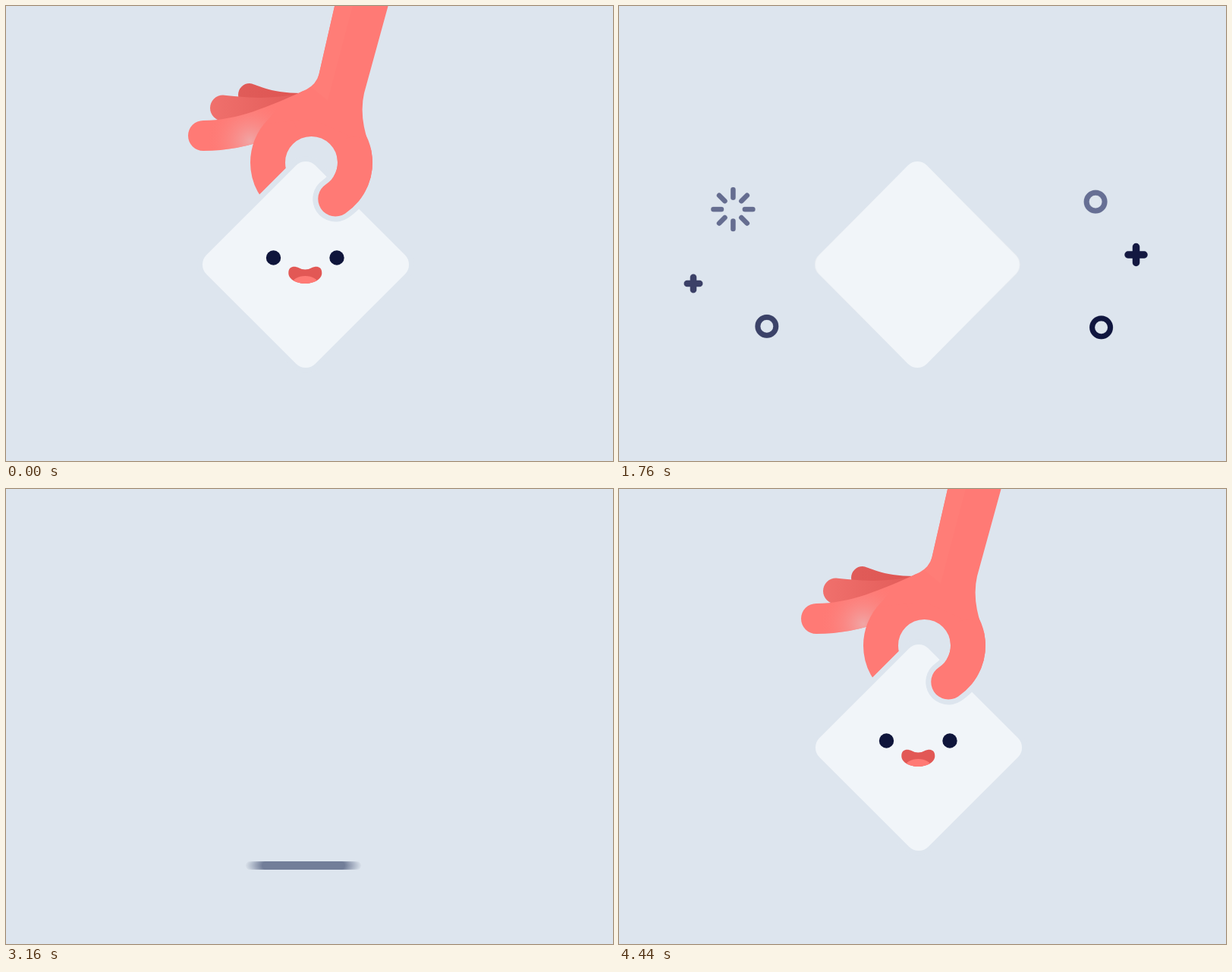
Animation of 800 by 600 pixels, one loop 4480 ms. Source, as an HTML page with a canvas:

```html
<!DOCTYPE html>
<html>
<head>
<meta charset="utf-8">
<style>
html, body { margin: 0; width: 100%; height: 100%; overflow: hidden; background: #dde5ee }
canvas { display: block }
</style>
</head>
<body>
<canvas id="stage" width="800" height="600"></canvas>
<script>
const LOOP = 4480, STEP = 40, SHUTTER = 20, SAMPLES = 12;
const BG = '#dde5ee', TILE = '#f1f5f9', SKIN = '#ff7a75', DARK = '#e25855', NAVY = '#0f153b';
const SLOT = [392, 540], HOME = [393, 340];

const out = document.getElementById('stage').getContext('2d');
const layer = document.createElement('canvas');
layer.width = 800;
layer.height = 600;
const c = layer.getContext('2d');

const clamp = x => Math.max(0, Math.min(1, x));
const mix = (a, b, u) => a + (b - a) * u;
const smooth = x => (x = clamp(x), x * x * (3 - 2 * x));
const span = (t, a, b) => clamp((t - a) / (b - a));

// Eased interpolation through [time, value] pairs.
function keys(t, list) {
  if (t <= list[0][0]) return list[0][1];
  for (let i = 1; i < list.length; i++) {
    const [a, v] = list[i - 1], [b, w] = list[i];
    if (t <= b) return mix(v, w, smooth((t - a) / (b - a)));
  }
  return list[list.length - 1][1];
}

function fill(path, style) {
  c.fillStyle = style;
  c.fill(new Path2D(path));
}

function stroke(path, width, style, cap = 'round') {
  c.lineWidth = width;
  c.lineCap = cap;
  c.strokeStyle = style;
  c.stroke(path);
}

function linear(x0, x1, a, b) {
  const g = c.createLinearGradient(x0, 0, x1, 0);
  g.addColorStop(0, a);
  g.addColorStop(1, b);
  return g;
}

// ---- hand ----
function handShape(open) {
  const r = mix(57.5, 82, open), x = mix(402.5, 397, open), y = 149 + r;
  const sweep = mix(146.5, 90, open) * Math.PI / 180, top = -Math.PI / 2;
  const rim = deg => {
    const a = deg * Math.PI / 180;
    return `${x + (r + 22) * Math.cos(a)},${y + (r + 22) * Math.sin(a)}`;
  };
  const left = new Path2D(), right = new Path2D(), curl = new Path2D();
  left.arc(x, y, r, top, top - sweep, true);
  right.arc(x, y, r, top, top + sweep);
  curl.arc(x, y, r, Math.min(-.2, top + sweep - .1), top + sweep);
  const palm = `M456,-100 L412.5,90 Q409,103 396,110 Q366,122 ${rim(-140)}
    L${x},${y - r} L${rim(-17)} Q465,145 472,115 L531,-100Z`;
  return { left, right, curl, palm };
}

function drawFingers(dx, dy) {
  const p = (x, y) => `${x + dx},${y + dy}`;
  fill(`M${p(321, 102)} C${p(328, 102)} 345,115 390,115 L380,135 L${p(321, 132)}
    A15,15 0 0 1 ${p(321, 102)}Z`, linear(306, 390, '#e05c59', '#df5552'));
  fill(`M${p(286, 117.5)} C${p(306, 119)} 345,126 390,114 L370,150 L${p(286, 151.5)}
    A17,17 0 0 1 ${p(286, 117.5)}Z`, linear(270, 385, '#f0706c', '#e25c59'));
  const front = `M${p(260, 151)} C${p(305, 151)} 345,133 392,112 L400,160 L350,174
    Q${p(305, 191)} ${p(260, 191)} A20,20 0 0 1 ${p(260, 151)}Z`;
  fill(front, SKIN);
  const glow = c.createRadialGradient(322, 178, 0, 322, 178, 58);
  glow.addColorStop(0, 'rgba(240,168,168,.95)');
  glow.addColorStop(1, 'rgba(255,122,117,0)');
  fill(front, glow);
}

function drawHand(shape, tipX, tipY) {
  drawFingers(tipX, tipY);
  stroke(shape.left, 46, SKIN);
  stroke(shape.right, 46, SKIN);
  fill(shape.palm, SKIN);
  fill('M456,-100 L412.5,90 Q411,100 402,107 L424,125 L457,0 L484,-100Z', '#ff7d77');
}

// ---- tile and face ----
function tilePath(x, y, sx, sy) {
  const box = new Path2D(), path = new Path2D();
  box.roundRect(-101.5, -101.5, 203, 203, 18);
  path.addPath(box, new DOMMatrix().translate(x, y).scale(sx, sy).rotate(45));
  return path;
}

const SMILE = [-22, 0, -22, -10, -13, -9, -9, -7, 0, -2, 9, -7, 13, -9, 22, -10, 22, 0, 22, 9, 10, 14, 0, 14, -10, 14, -22, 9, -22, 0];
const ROUND = [-13, 1, -13, -6, -8, -11, -4, -12, 0, -13, 4, -12, 8, -11, 13, -6, 13, 1, 13, 8, 7, 14, 0, 14, -7, 14, -13, 8, -13, 1];

function drawFace(f) {
  c.fillStyle = NAVY;
  for (const x of [-42.5, 41]) {
    c.beginPath();
    c.ellipse(x, -9, 9.7, f.eye, 0, 0, 7);
    c.fill();
  }
  const v = SMILE.map((n, i) => mix(n, ROUND[i], f.round));
  c.save();
  c.translate(-.7, 11);
  c.scale(f.wide, f.tall);
  c.beginPath();
  c.moveTo(v[0], v[1]);
  c.bezierCurveTo(...v.slice(2, 8));
  c.quadraticCurveTo(...v.slice(8, 12));
  for (const i of [12, 18, 24]) c.bezierCurveTo(...v.slice(i, i + 6));
  c.fillStyle = DARK;
  c.fill();
  c.clip();
  c.beginPath();
  c.ellipse(0, 14, 17, 10, 0, 0, 7);
  c.fillStyle = SKIN;
  c.fill();
  c.restore();
}

function drawCheck(u) {
  const path = new Path2D('M-32,4 L-8,28 L31,-12');
  c.setLineDash([90 * u, 200]);
  stroke(path, 11, '#ff736d', 'butt');
  c.setLineDash([]);
}

// ---- small icons ----
const ring = new Path2D();
ring.arc(0, 0, 12, 0, 7);
const plus = n => new Path2D(`M${-n},0H${n}M0,${-n}V${n}`);
const rays = new Path2D();
for (let i = 0; i < 8; i++) {
  const x = Math.cos(i * Math.PI / 4), y = Math.sin(i * Math.PI / 4);
  rays.moveTo(15.5 * x, 15.5 * y);
  rays.lineTo(26 * x, 26 * y);
}

// spread: after the burst, drift: before the fall, via: a point on the way down
const icons = [
  { path: rays, width: 6.5, color: '#656d90', spread: [150, 268], drift: [158, 266], via: [232, 314], wait: 38 },
  { path: plus(8.2), width: 8.5, color: '#3b4067', spread: [97.5, 366], drift: [104, 366], via: [142, 373], wait: 72 },
  { path: ring, width: 7, color: '#3b4268', spread: [194.5, 422.5], drift: [200, 418], via: [271, 445], wait: 0 },
  { path: ring, width: 7, color: '#666f94', spread: [628.5, 258], drift: [602, 262], via: [556, 295], wait: 45 },
  { path: plus(10.5), width: 9.5, color: '#131841', spread: [682, 328], drift: [643, 331], via: [609, 347], wait: 72 },
  { path: ring, width: 7, color: '#10163f', spread: [636, 424], drift: [612, 412], via: [508, 438], wait: 0 }
];
const fallen = (t, wait) => Math.min(1, .5 * (Math.max(0, t - 2520 - wait) / 240) ** 4);

function drawIcon(icon, t) {
  const burst = 1 - (1 - span(t, 1520, 1820)) ** 4;
  const u = fallen(t, icon.wait), k = fallen(2760, icon.wait);
  if (!burst || u === 1) return;
  const pos = [0, 1].map(i => {
    const start = mix(mix(HOME[i], icon.spread[i], burst), icon.drift[i], smooth(span(t, 1760, 2320)));
    const bend = (icon.via[i] - (1 - k) ** 2 * icon.drift[i] - k * k * SLOT[i]) / (2 * k * (1 - k));
    return (1 - u) ** 2 * start + 2 * u * (1 - u) * bend + u * u * SLOT[i];
  });
  c.save();
  c.translate(...pos);
  c.scale(burst, burst);
  stroke(icon.path, icon.width, icon.color);
  c.restore();
}

function drawBar(t) {
  const half = 119.5 * (1 - (1 - span(t, 2000, 2240)) ** 3) * (1 - smooth(span(t, 3080, 3240)));
  if (half > 0) stroke(new Path2D(`M${392 - half},496.5H${392 + half + .01}`), 11, '#727e99');
}

// ---- one instant ----
function scene(t) {
  c.fillStyle = BG;
  c.fillRect(0, 0, 800, 600);
  const entering = t > 3300;
  const late = entering ? smooth(span(t, 3980, 3700) * 2 * .5 + (t < 3840 ? .5 : 0)) : 0;
  const lag = entering ? Math.min(1, late * 2) : 0;

  let x = 395, y = 341, turn = 1, size = 1, handY = 0;
  if (entering) {
    const drop = 14 - 504 * (1 - span(t, 3420, 3980)) ** 2.4;
    const dy = t < 3980 ? drop : 14 * (1 - smooth(span(t, 3980, 4400)));
    y += dy;
    handY = dy - 6.5 * lag;
  } else {
    const flip = span(t, 1460, 1800);
    turn = Math.cos(Math.PI * (.5 - .5 * Math.cos(Math.PI * flip)));
    x -= 2 * flip;
    if (t > 2696) y = 230 + .0072 * (t - 2820) ** 2;
    size = 1 - .12 * smooth(span(t, 2840, 2980));
    handY = -94 * (Math.max(0, t - 600) / 120) ** 2.2;
  }

  const handOn = t < 900 || t > 3420;
  const open = entering ? 0 : keys(t, [[20, 0], [200, -.08], [420, 1.5], [560, 1]]);
  const swing = entering ? 0 : keys(t, [[60, 0], [400, 1], [580, 0]]);
  const shape = handOn && handShape(open);
  if (handOn) {
    c.save();
    c.translate(0, handY);
    drawHand(shape, -2 * lag - 4 * swing, 9 * lag - 8 * swing);
    c.restore();
  }

  c.save();
  if (t > 1400 && !entering) {
    c.beginPath();
    c.rect(0, 0, 800, 496);
    c.clip();
    for (const icon of icons) drawIcon(icon, t);
  }
  if (t < 3080 || t > 3420) {
    const sx = Math.max(.01, Math.abs(turn)) * size;
    const tile = tilePath(x, y, sx, size);
    if (handOn) stroke(tile, 14, BG);
    c.fillStyle = TILE;
    c.fill(tile);
    c.save();
    c.translate(x, y);
    c.scale(sx, size);
    if (turn > 0) {
      drawFace({
        eye: 9.7 * keys(t, [[950, 1], [1010, .12], [1080, 1]]) + 1.3 * lag,
        round: keys(t, [[440, 0], [660, 1], [1200, 1], [1360, 0]]),
        wide: 1 + .11 * lag,
        tall: keys(t, [[740, 1], [860, 1.25], [1080, 1]])
      });
    } else if (t > 2000) drawCheck(smooth(span(t, 2000, 2240)));
    c.restore();
    if (handOn) {
      c.save();
      c.clip(tile);
      c.translate(0, handY);
      stroke(shape.curl, 60, BG);
      c.restore();
      c.translate(0, handY);
      stroke(shape.curl, 46, SKIN);
    }
  }
  c.restore();
  if (!entering) drawBar(t);
}

// Average several instants for motion blur.
function render(t) {
  for (let i = 0; i < SAMPLES; i++) {
    scene(t + SHUTTER * ((i + .5) / SAMPLES - .5));
    out.globalAlpha = 1 / (i + 1);
    out.drawImage(layer, 0, 0);
  }
}

let shown = -1;
function tick() {
  const t = Math.floor(performance.now() % LOOP / STEP) * STEP;
  if (t !== shown) render(shown = t);
  requestAnimationFrame(tick);
}
tick();
</script>
</body>
</html>
```
